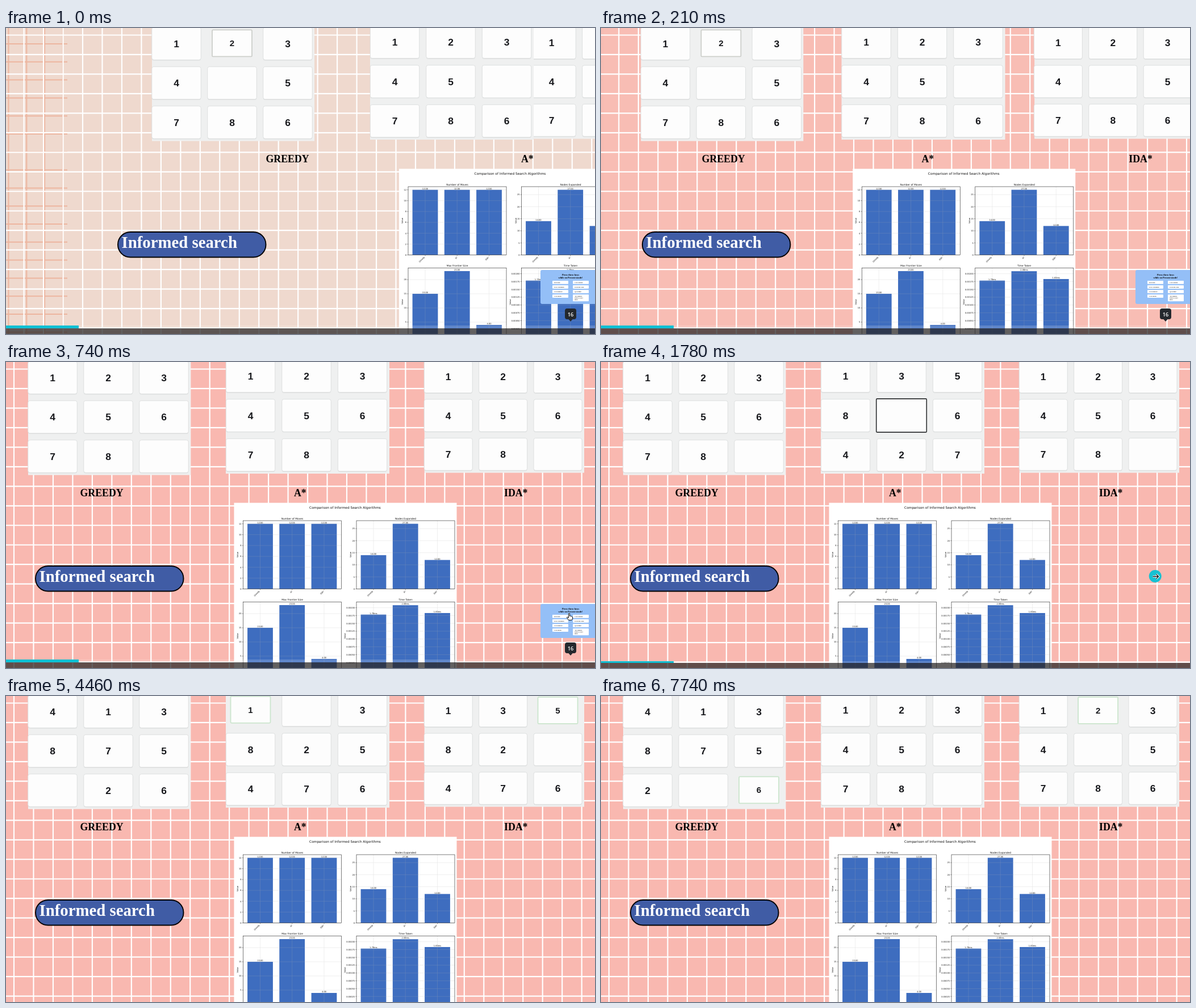
Animation, 1037 px wide and 540 px high, one loop 8000 ms. Source, as an HTML page:

```html
<!DOCTYPE html>
<html lang="en">
<head>
<meta charset="utf-8">
<title>Informed search</title>
<style>
html, body { margin: 0; width: 100%; height: 100%; overflow: hidden; background: #f9b8b0; }
svg { display: block; width: 100%; height: 100%; }
.serif { font-family: "Liberation Serif", Tinos, serif; font-weight: bold; }
.digit { font-family: "Liberation Sans", Arial, sans-serif; font-weight: bold; text-anchor: middle; fill: #17181c; }
.plot { font-family: "DejaVu Sans", sans-serif; fill: #111; }
.pin { font-family: "Open Sans", sans-serif; font-weight: 600; }
.mid { text-anchor: middle; }
.end { text-anchor: end; }
</style>
</head>
<body>
<svg id="stage" viewBox="0 0 1037 540" preserveAspectRatio="none"></svg>
<script>
const LOOP = 8000;
const stage = document.getElementById('stage');

const rect = (x, y, w, h, fill, extra = '') =>
  `<rect x="${x}" y="${y}" width="${w}" height="${h}" fill="${fill}" ${extra}/>`;
const text = (x, y, size, str, cls, extra = '') =>
  `<text x="${x}" y="${y}" font-size="${size}" class="${cls}" ${extra}>${str}</text>`;
const hLine = (y, x1, x2) => `M${x1} ${y}H${x2}`;
const vLine = (x, y1, y2) => `M${x} ${y1}V${y2}`;
const range = (n, fn) => Array.from({ length: n }, (_, i) => fn(i));

// ---------- background grid ----------
const CELL = 34.47;
const whiteGrid = `<path id="rows" stroke="#fff" stroke-width="2.2" d="${
  range(16, i => hLine(12.5 + i * CELL, 0, 1037)).join('')}"/>
  <path id="cols" stroke="#fff" stroke-width="2.2" d="${
  range(37, i => vLine(14 + (i - 5) * CELL, 0, 540)).join('')}"/>`;
const oldGrid = `<clipPath id="oldClip"><rect id="oldEdge" width="108" height="540"/></clipPath>
  <g id="old" clip-path="url(#oldClip)"><path stroke="#edb59f" stroke-width="2" d="${
  range(17, i => hLine(28 + i * 31.8, 0, 130)).join('') +
  range(4, i => vLine(4.5 + i * 31.8, 0, 540)).join('')}"/></g>`;

// ---------- chart ----------
const BLUE = '#3e6dbf';
const NAMES = ['Greedy', 'A*', 'IDA*'];

function axes({ x, top, zero, title, unit, ticks, tick, values, label }) {
  const w = 173, bottom = zero;
  const centers = [30, 86.2, 142.5].map(d => x + d);
  const y = v => zero - v * unit;
  let out = text(x + w / 2, top - 2.3, 4.4, title, 'plot mid');
  values.forEach((v, i) => {
    out += rect(centers[i] - 22.4, y(v), 44.8, zero - y(v), BLUE);
  });
  out += `<path stroke="#b0b0b0" stroke-width=".5" opacity=".4" d="${
    ticks.map(v => hLine(y(v), x, x + w)).join('') +
    centers.map(c => vLine(c, top, bottom)).join('')}"/>`;
  out += `<path stroke="#222" stroke-width=".5" d="${
    ticks.map(v => hLine(y(v), x - 1.7, x)).join('') +
    centers.map(c => vLine(c, bottom, bottom + 1.7)).join('')}"/>`;
  ticks.forEach(v => { out += text(x - 3, y(v) + 1.4, 3.6, tick(v), 'plot end'); });
  values.forEach((v, i) => {
    out += text(centers[i], y(v) - .8, 3.6, label(v), 'plot mid');
    const dx = [-6, -1.5, -3.5][i], dy = [8.8, 6, 7.2][i];
    out += text(0, 0, 3.6, NAMES[i], 'plot mid',
      `transform="translate(${centers[i] + dx + 1} ${bottom + dy}) rotate(-45)"`);
  });
  const labelX = x - (unit > 50 ? 19 : 8.8);
  out += text(0, 0, 3.7, 'Value', 'plot mid',
    `transform="translate(${labelX} ${top + 60}) rotate(-90)"`);
  return out + rect(x, top, w, bottom - top, 'none', 'stroke="#222" stroke-width=".6"');
}

const whole = v => v, fixed = v => v.toFixed(2);
const chart = rect(401.5, 248.5, 392, 300, '#fff') +
  text(597, 258.8, 5.83, 'Comparison of Informed Search Algorithms', 'plot mid') +
  axes({ x: 417.5, top: 280, zero: 400.5, title: 'Number of Moves', unit: 9.58,
    ticks: [0, 2, 4, 6, 8, 10, 12], tick: whole, values: [12, 12, 12], label: fixed }) +
  axes({ x: 617, top: 280, zero: 400.5, title: 'Nodes Expanded', unit: 4.26,
    ticks: [0, 5, 10, 15, 20, 25], tick: whole, values: [14, 27, 12], label: fixed }) +
  axes({ x: 417.5, top: 423.5, zero: 544, title: 'Max Frontier Size', unit: 5,
    ticks: [5, 10, 15, 20], tick: whole, values: [15, 23, 4], label: fixed }) +
  axes({ x: 617, top: 423.5, zero: 544, title: 'Time Taken', unit: 55.2,
    ticks: range(8, i => (i + 1) / 4), tick: v => (v / 1000).toFixed(5),
    values: [1.78, 2.08, 1.83], label: v => v.toFixed(2) + 'ms' });

const pill = rect(52, 360, 260.5, 44.5, '#405ca5', 'rx="22" stroke="#000" stroke-width="1.9"') +
  text(58.5, 388.3, 28.8, 'Informed search', 'serif', 'fill="#fff"');

// ---------- puzzle boards ----------
const GOAL = '12345678 ';
const BLANK_STEP = { U: [0, -1], D: [0, 1], L: [-1, 0], R: [1, 0] };
const SOLVE = 'DRUULDLDRURD';

const boards = [
  { id: 'greedy', x: 39, w: 286, bottom: 199.5, cx: 82, cy: 27.5, px: 98, py: 69.5, tw: 86.5, th: 57.5, slide: 218,
    runs: [
      { at: 0, cells: '1234857 6', path: 'U', times: [0] },
      { at: 740, cells: GOAL },
      { at: 3260, cells: '4138 5276', path: 'DLUU', times: [3730, 4260, 4730, 5250], focus: true },
      { at: 5710, cells: ' 23785146', path: 'DDRU', times: [5710, 6210, 6740, 7210] },
      { at: 7740, cells: '413875 26', path: 'R', times: [7740] }] },
  { id: 'ida', x: 737, w: 281, bottom: 195.5, cx: 778.7, cy: 26, px: 96.4, py: 68.4, tw: 85, th: 57, slide: 182,
    runs: [
      { at: 0, cells: '1234 5786' },
      { at: 740, cells: GOAL },
      { at: 3400, cells: '1358 6427', path: SOLVE, focus: true,
        times: [3730, 3990, 4460, 4790, 5250, 5710, 6210, 6740, 7210, 7740] }] },
  { id: 'astar', x: 387, w: 288, bottom: 197, cx: 430.5, cy: 24.7, px: 98.5, py: 69.7, tw: 86.5, th: 57.5, slide: 254,
    runs: [
      { at: 0, cells: '12345 786' },
      { at: 740, cells: GOAL },
      { at: 1440, cells: '1358 6427', path: SOLVE, focus: true,
        times: [2260, 2860, 3400, 3730, 4260, 4730, 5250, 5710, 6210, 6740, 7210, 7740] }] }
];

function boardState(board, t) {
  const run = board.runs.filter(r => t >= r.at).pop();
  const cells = [...run.cells];
  const done = (run.times || []).filter(at => t >= at).length;
  let small = -1;
  for (const step of (run.path || '').slice(0, done)) {
    const [dx, dy] = BLANK_STEP[step];
    const from = cells.indexOf(' ');
    const x = from % 3 + dx, y = Math.floor(from / 3) + dy;
    const to = y * 3 + x;
    [cells[from], cells[to]] = [cells[to], ' '];
    const inside = x + dx >= 0 && x + dx < 3 && y + dy >= 0 && y + dy < 3;
    small = inside ? to + dx + 3 * dy : -1;
  }
  return { cells, small, focus: run.focus && !done, edge: t < 740 ? '#cdcfcb' : '#cbe5cd' };
}

function drawBoard(b, { cells, small, focus, edge }) {
  let out = rect(b.x, -10, b.w, b.bottom + 10, '#eff0f0');
  cells.forEach((n, i) => {
    const cx = b.cx + i % 3 * b.px, cy = b.cy + Math.floor(i / 3) * b.py;
    const tiny = i === small, framed = focus && n === ' ';
    const w = tiny ? 70 : framed ? 88.5 : b.tw, h = tiny ? 47 : framed ? 59 : b.th;
    const stroke = tiny ? edge : framed ? '#2f3133' : '#d9dbdb';
    const y = cy - h / 2 - (tiny ? .6 : 0);
    if (!tiny && !framed) out += rect(cx - w / 2, y + 1.2, w, h, '#dfe1e1', 'rx="3.5"');
    out += rect(cx - w / 2, y, w, h, '#fdfdfd',
      `rx="${tiny || framed ? 1.5 : 3.5}" stroke="${stroke}" stroke-width="${tiny ? 1.8 : framed ? 1.6 : .8}"`);
    if (n !== ' ') out += text(cx, cy + (tiny ? 4.9 : 6.2), tiny ? 15 : 17.4, n, 'digit');
  });
  return out;
}

// ---------- player controls ----------
const KEYS = [
  ['B for blur', 'C for confetti'], ['D for a drumroll', 'M for mic drop'],
  ['O for bubbles', 'Q for quiet'], ['U for unveil', '']
];
const preview = rect(941, 427, 100, 60, '#94bff7', 'rx="3"') +
  text(994, 437, 4.4, 'Press these keys', 'serif mid') +
  text(994, 441.8, 4.3, 'while on Present mode!', 'serif mid') +
  KEYS.map((row, r) => row.map((key, c) => {
    const x = 962 + c * 36, y = 446 + r * 8.1;
    return rect(x, y, 28, key ? 5.8 : 12, '#fff', 'rx=".8"') +
      text(x + 3, y + 3.8, 2.5, key, 'serif');
  }).join('')).join('') +
  ['Any number', 'from 0-9 for a', 'timer'].map((s, i) => text(1001, 473.6 + i * 3, 2.5, s, 'serif')).join('') +
  `<path d="M988 495H1000Q1004 495 1004 499V510Q1004 514 1000 514H997.5L994 518L990.500 514H988Q984 514 984 510V499Q984 495 988 495Z" fill="#24282d"/>` +
  text(994, 508.5, 9.2, '16', 'pin mid', 'fill="#fff"');

const hand = `<path transform="translate(993 449)" fill="#fff" stroke="#111" stroke-width="1"
  d="M-2.500 -5Q-1.500 -7 -.5 -5V-.5Q.7 -1.600 1.600 -.2Q2.800 -1 3.400 .6Q4.600 .2 4.600 2V4L3 6.500H-2.500L-5.500 2.200Q-5.600 .6 -4 1.200L-2.500 2.600Z"/>`;
const arrowPath = 'M971.500 378.500H981.500M977.500 374.500L981.500 378.500L977.500 382.500';
const arrow = `<g fill="none"><path d="${arrowPath}" stroke="#fff" stroke-width="3.4"/>
  <path d="${arrowPath}" stroke="#111" stroke-width="1.3"/></g>`;

// ---------- scene ----------
const sliding = [
  ['chart', 290.5, chart],
  ['pill', 145, pill],
  ['nameGreedy', 327, text(130.5, 237, 17.8, 'GREEDY', 'serif')],
  ['nameAstar', 400, text(507, 237, 17.8, 'A*', 'serif')],
  ['nameIda', 364, text(877, 237, 17.8, 'IDA*', 'serif')]
];
stage.innerHTML = rect(0, 0, 1037, 540, '#f9b8b0', 'id="paper"') + oldGrid + whiteGrid +
  boards.map(b => `<g id="${b.id}"></g>`).join('') +
  sliding.map(([id, , body]) => `<g id="${id}">${body}</g>`).join('') +
  `<g id="controls">${rect(128, 0, 909, 5, '#fff', 'id="track" opacity=".17"')}
   ${rect(0, 0, 128, 5, '#0fc0d4', 'id="played"')}
   ${rect(0, 0, 1037, 20, '#282625', 'id="strip" opacity=".73"')}</g>
   <g id="preview">${preview}</g><g id="hand">${hand}</g>
   <circle id="dot" cx="975.7" cy="378" r="11" fill="#17c1d2"/><g id="arrow">${arrow}</g>`;

const el = id => document.getElementById(id);
const set = (id, name, value) => el(id).setAttribute(name, value);
const shift = (id, x, y = 0) => set(id, 'transform', `translate(${x.toFixed(2)} ${y.toFixed(2)})`);
const show = (id, on) => set(id, 'opacity', Number(on));
const ramp = (t, a, b) => Math.min(1, Math.max(0, (t - a) / (b - a)));
const mix = (a, b, k) => a + (b - a) * k;

function render(t) {
  // The page slides in at 15 pictures per second.
  const step = Math.floor(t * .015) / .015;
  const rest = (1 - ramp(step, 0, 420)) ** 3;

  set('paper', 'fill', `rgb(${[[249, 239], [184, 217], [176, 206]].map(([a, b]) => Math.round(mix(a, b, rest)))})`);
  shift('cols', 121 * rest);
  set('oldEdge', 'width', Math.max(0, 121 * rest - 13));
  show('old', rest);
  sliding.forEach(([id, dx]) => shift(id, dx * rest));
  boards.forEach(b => {
    shift(b.id, b.slide * rest);
    const state = boardState(b, t), key = JSON.stringify(state);
    if (b.key !== key) {
      b.key = key;
      el(b.id).innerHTML = drawBoard(b, state);
    }
  });

  const thin = ramp(t, 1000, 1240);
  const barH = mix(5, 3, thin);
  const top = t >= 3400 ? 534 : mix(530, 531, thin);
  show('controls', t < 3470);
  ['track', 'played'].forEach(id => {
    set(id, 'y', top - barH);
    set(id, 'height', barH);
  });
  set('strip', 'y', top);

  show('preview', 1 - ramp(t, 930, 1130));
  const go = ramp(t, 800, 1130);
  show('hand', t >= 740 && t < 1130);
  shift('hand', -17 * go, -71 * go);
  show('dot', t < 1130 ? 0 : 1 - ramp(t, 1980, 2590));
  show('arrow', t >= 1130 && t < 3990);
}

const start = performance.now();
function tick() {
  render((performance.now() - start) % LOOP);
  requestAnimationFrame(tick);
}
render(0);
requestAnimationFrame(tick);
</script>
</body>
</html>
```
